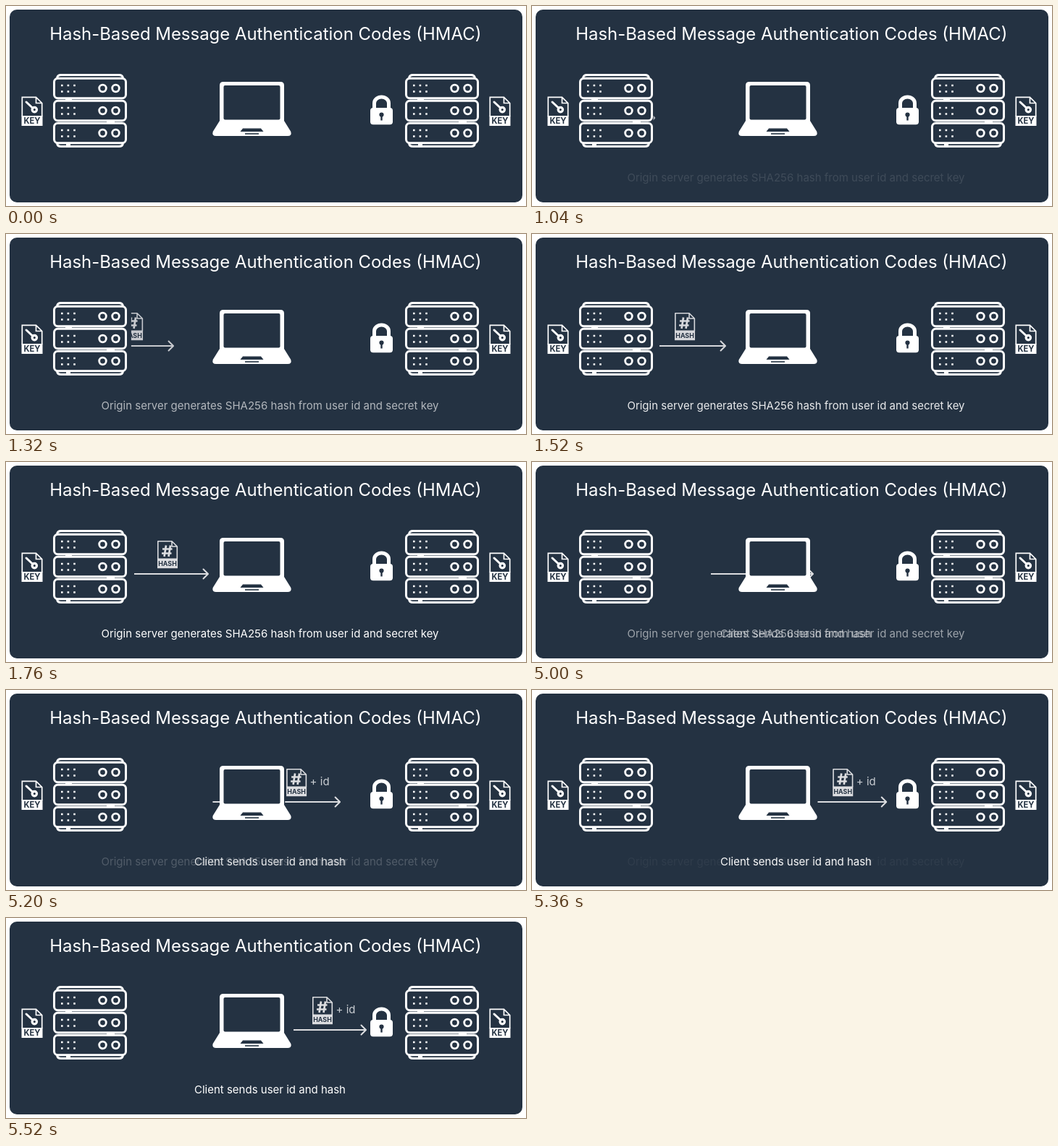
Animation, 718 px wide and 277 px high, one loop 8 s. Source, as an HTML page:

```html
<!DOCTYPE html>
<html lang="en">
<head>
<meta charset="utf-8">
<title>Hash-Based Message Authentication Codes</title>
<style>
  html, body { margin: 0; width: 100%; height: 100%; overflow: hidden; background: #fff; }
  svg { display: block; width: 718px; height: 277px; }
  text { font-family: Inter, "Open Sans", sans-serif; text-anchor: middle; fill: #fff; }
  .title { font-size: 23.95px; }
  .note { font-size: 15px; }
  .tag { font-weight: 700; fill: #243242; }
  .line { fill: none; stroke: #fff; }
  .bg { fill: #243242; }
  .soft { fill: #dcdde0; }
  .softline { fill: none; stroke: #dcdde0; stroke-width: 2; stroke-linecap: round; stroke-linejoin: round; }
</style>
</head>
<body>
<svg viewBox="0 0 718 277">
  <defs>
    <g id="unit">
      <rect class="line" x="66.5" y="100.3" width="99" height="27.4" rx="5" stroke-width="3"/>
      <path class="line" d="M76 110h20M76 118.5h20" stroke-width="2.6" stroke-dasharray="2.6 6"/>
      <circle class="line" cx="133.5" cy="114" r="4.8" stroke-width="2.8"/>
      <circle class="line" cx="151.5" cy="114" r="4.8" stroke-width="2.8"/>
    </g>
    <g id="server">
      <path class="line" stroke-width="3" d="M70.5 100Q71 95.500 76 95.500H156Q161 95.500 161.500 100M70.500 190Q71 194.500 76 194.500H156Q161 194.500 161.500 190"/>
      <use href="#unit"/>
      <use href="#unit" y="31"/>
      <use href="#unit" y="62"/>
      <path class="line" d="M82 129.500h9M139 160.500h11M83 192h6" stroke-width="4"/>
    </g>
    <g id="key">
      <path class="line" d="M22.300 153V126.300H41.500L49.700 134.500V153M41.500 126.300V134.500H49.700" stroke-width="1.700"/>
      <path d="M28 133L37 141.500" stroke="#fff" stroke-width="3" stroke-linecap="round"/>
      <circle class="line" cx="39.300" cy="143.600" r="3.200" stroke-width="3.200"/>
      <rect x="21.500" y="152" width="29" height="14" fill="#fff"/>
      <text class="tag" x="36" y="163" font-size="11.200">KEY</text>
    </g>
    <g id="hash">
      <path class="softline" style="stroke-width:1.6" d="M209.8 134V109.8H229L236.3 117V134M229 109.8V117H236.3"/>
      <path class="softline" style="stroke-width:2.7;stroke-linecap:butt" d="M221 115.500L218.500 131M227 115.500L224.500 131M216 120.500H229.500M215 126.500H228.500"/>
      <rect class="soft" x="209" y="133.5" width="28" height="13.7"/>
      <text class="tag" x="223" y="143.600" font-size="8.900">HASH</text>
    </g>
    <path id="head" class="softline" d="M272.5 148.5L279 155L272.5 161.5"/>
    <clipPath id="clipA"><rect id="boxA" y="100" height="70"/></clipPath>
    <clipPath id="clipB"><rect id="boxB" y="100" height="70"/></clipPath>
  </defs>

  <rect class="bg" x="5" y="5" width="708" height="267" rx="10"/>
  <text class="title" x="358.3" y="47">Hash-Based Message Authentication Codes (HMAC)</text>

  <g id="sendA" clip-path="url(#clipA)">
    <g id="moveA">
      <use href="#hash"/>
      <use href="#head"/>
      <path class="softline" d="M60 155H278"/>
    </g>
  </g>
  <g id="sendB" clip-path="url(#clipB)">
    <g id="moveB">
      <use href="#hash" x="214"/>
      <use href="#head" x="218"/>
      <path class="softline" d="M318 155H496"/>
      <text x="469" y="132" font-size="15" style="fill:#c9cdd2">+ id</text>
    </g>
  </g>

  <use href="#server"/>
  <use href="#server" x="486"/>
  <use href="#key"/>
  <use href="#key" x="646"/>

  <g id="laptop">
    <path fill="#fff" d="M300 105H379Q384 105 384 110V159L393.3 174Q395 180 389 180H290Q284 180 285.7 174L295 159V110Q295 105 300 105Z"/>
    <rect class="bg" x="300.5" y="110" width="78" height="47.5" rx="2"/>
    <path class="bg" d="M327 169.5H352L355.5 174H323.5Z"/>
    <path d="M330 177H349" stroke="#243242" stroke-width="1.6"/>
  </g>

  <g id="lock">
    <path class="line" d="M508.5 143V134.5a10 8.5 0 0 1 20 0V143" stroke-width="5"/>
    <rect x="503" y="141" width="31" height="23.3" rx="4" fill="#fff"/>
    <circle class="bg" cx="518.5" cy="150.5" r="3.1"/>
    <path d="M518.5 151V158.5" stroke="#243242" stroke-width="2.4"/>
  </g>

  <text id="noteA" class="note" x="364.5" y="243">Origin server generates SHA256 hash from user id and secret key</text>
  <text id="noteB" class="note" x="364.5" y="243">Client sends user id and hash</text>
</svg>
<script>
  const LOOP = 8000, STEP = 40;
  const $ = id => document.getElementById(id);
  const mix = (a, b, p) => a + (b - a) * p;
  const clamp = v => Math.min(1, Math.max(0, v));

  function bezier(x1, y1, x2, y2) {
    const at = (a, b, s) => 3 * (1 - s) * (1 - s) * s * a + 3 * (1 - s) * s * s * b + s * s * s;
    return x => {
      let lo = 0, hi = 1;
      for (let i = 0; i < 24; i++) {
        const mid = (lo + hi) / 2;
        if (at(x1, x2, mid) < x) lo = mid; else hi = mid;
      }
      return at(y1, y2, hi);
    };
  }

  const grow = bezier(.3, .1, .4, 1);
  const fade = bezier(.3, .3, .5, 1);
  const ease = bezier(.25, .1, .25, 1);

  const span = (t, start, length, curve) => curve(clamp((t - start) / length));
  const show = (id, on) => $(id).setAttribute('visibility', on ? 'visible' : 'hidden');
  const shift = (id, x) => $(id).setAttribute('transform', `translate(${x} 0)`);
  function crop(id, left, right) {
    $(id).setAttribute('x', left);
    $(id).setAttribute('width', Math.max(0, right - left));
  }

  function draw(now) {
    const t = Math.floor((now % LOOP) / STEP) * STEP;
    const first = t >= 1040, second = t >= 4800, done = t >= 5520;
    const inA = span(t, 1020, 740, grow);
    const outA = second ? span(t, 4740, 800, ease) : 0;
    const inB = span(t, 4780, 740, grow);

    // first message: grows out of the server, then slides behind the laptop
    const tipA = mix(168, 279, inA);
    show('sendA', first && !done);
    shift('moveA', tipA - 279 + 214 * outA);
    crop('boxA', mix(167.5, 177, inA) + 125 * outA, second ? 296 : tipA + 1.5);
    $('moveA').setAttribute('opacity', mix(.75, 1, inA));

    // second message: emerges from behind the laptop
    const tipB = mix(323, 497, inB);
    show('sendB', second);
    shift('moveB', tipB - 497);
    crop('boxB', mix(340, 397, inB), tipB + 1.5);

    const noteIn = span(t, 960, 800, fade);
    const noteOut = second ? span(t, 4760, 760, fade) : 0;
    $('noteA').setAttribute('opacity', first ? noteIn * (1 - noteOut) : 0);
    $('noteB').setAttribute('opacity', done ? 1 : outA);

    // keep the emerging message out of the laptop's left side
    $('sendB').style.display = tipB > 384 ? '' : 'none';
  }

  const begin = performance.now();
  function tick() {
    draw(performance.now() - begin);
    requestAnimationFrame(tick);
  }
  tick();
</script>
</body>
</html>
```
